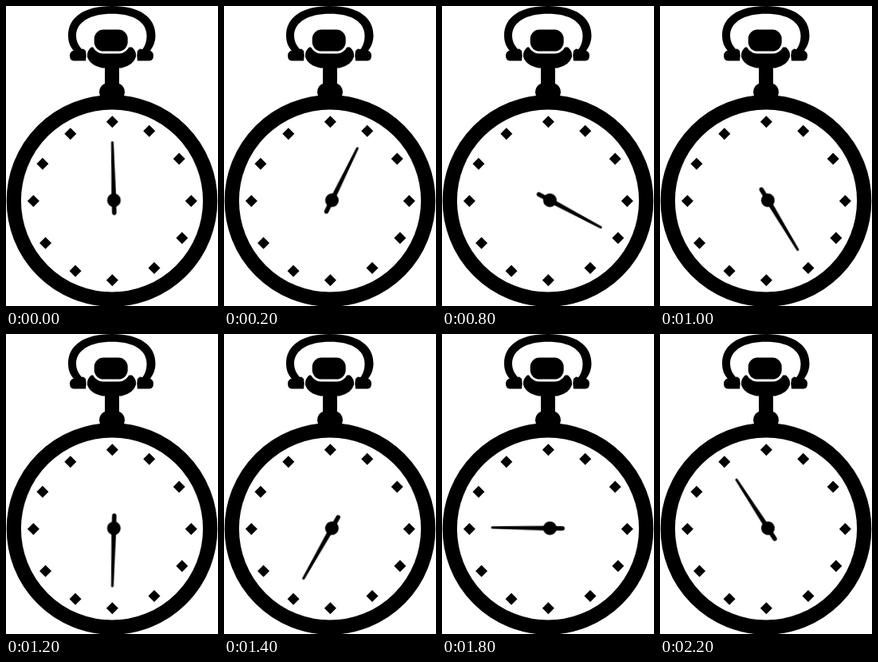
Write an HTML page that moves like this. It is 266 px wide and 375 px high and loops after 2.4 s.

```html
<!DOCTYPE html>
<html lang="en">
<head>
<meta charset="utf-8">
<title>Stopwatch</title>
<style>
  html, body { margin: 0; width: 100%; height: 100%; overflow: hidden; background: #fff; }
  svg { display: block; width: 100vw; height: 100vh; }
  #hand { filter: blur(.4px); }
</style>
</head>
<body>
<svg viewBox="0 0 266 375">
  <!-- bow and its feet -->
  <path d="M86 57C80 51 78 44 78 37C78 14 98 0 133 0S187.5 14 187.5 37C187.5 44 185 51 180 57H169
           C175 50 176.5 44 176.5 37C176.5 20 160 9.8 133 9.8S88 20 88 37C88 44 91 50 97 56Z"/>
  <path id="foot" d="M85 55.5L97 53.5L100 56Q101.5 62 100 68.5H85Q80 68 80 62Q80 57 85 55.5Z"/>
  <use href="#foot" transform="matrix(-1 0 0 1 265 0)"/>
  <!-- crown, stem and collar -->
  <path d="M107 51.5Q101 56.5 102 63.5Q105 74 121 77.5H145Q160 74 163 63.5Q164 56.5 158 51.5Z"/>
  <rect x="110.7" y="29.6" width="42" height="27" rx="11.5" stroke="#fff" stroke-width="6" paint-order="stroke"/>
  <path d="M124 75H142V97Q149 100 149 108L147 117H119L117 108Q117 100 124 97Z"/>
  <circle cx="133" cy="243.5" r="123.2" fill="#fff" stroke="#000" stroke-width="18.2"/>
  <g id="marks" transform="translate(133.4 243.7)"></g>
  <g id="hand">
    <path d="M0 -2.9L73 -1.5Q74.5 0 73 1.5L0 2.9Z"/>
    <path d="M0 0H-15.7" stroke="#000" stroke-width="5.6" stroke-linecap="round"/>
    <circle r="8.6"/>
  </g>
</svg>
<script>
const STEPS = 12, STEP_MS = 200, MARK_RADIUS = 99;
const HUB = { x: 135.4, y: 242.8 };
const rad = deg => deg * Math.PI / 180;

// Clockwise from the top; only the quarter stops sit exactly on their angle
const dialAngle = i => i * 360 / STEPS - (i % 3 ? 2.1 : 0);

const diamond = i => {
  const a = rad(dialAngle(i));
  const x = MARK_RADIUS * Math.sin(a), y = -MARK_RADIUS * Math.cos(a);
  return `<path d="M${x} ${y - 7.5}l7.5 7.5l-7.5 7.5l-7.5 -7.5Z"/>`;
};
document.getElementById('marks').innerHTML = Array.from({ length: STEPS }, (_, i) => diamond(i)).join('');
const hand = document.getElementById('hand');

function draw(ms) {
  const angle = dialAngle(Math.floor(ms / STEP_MS) % STEPS);
  const lean = 1.7 * Math.cos(rad(angle - 25)); // the hub sits off the dial's centre
  hand.setAttribute('transform', `translate(${HUB.x} ${HUB.y}) rotate(${angle - lean - 90})`);
}

function tick() {
  draw(performance.now());
  requestAnimationFrame(tick);
}
tick();
</script>
</body>
</html>
```
